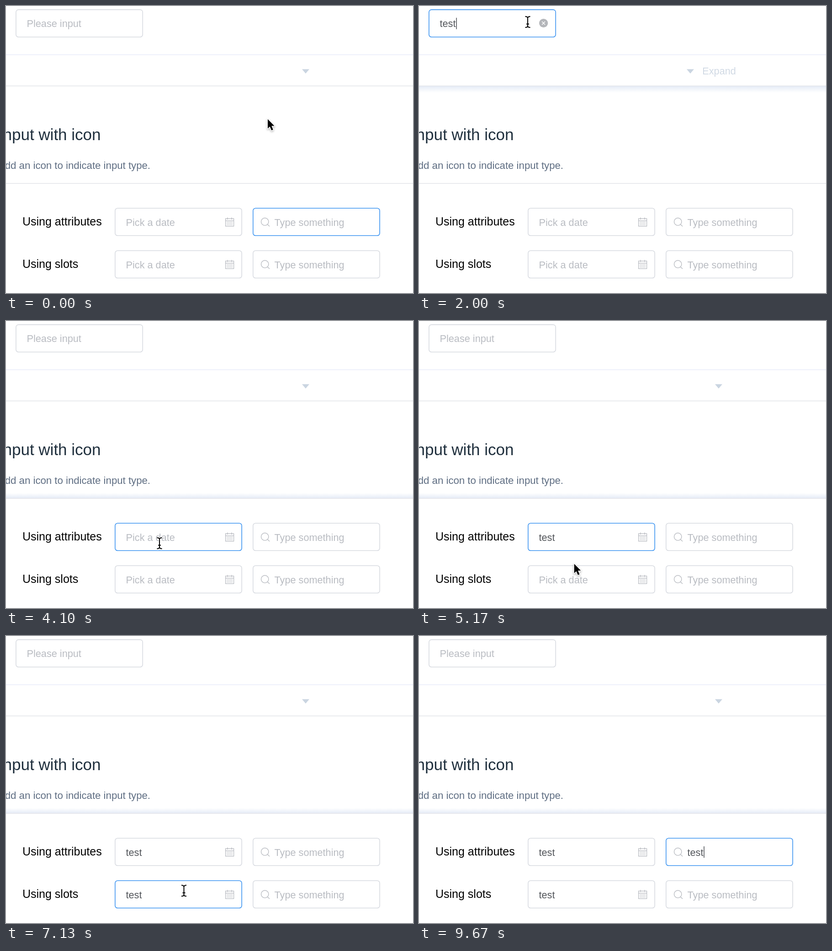
These frames come from a looping animation (891 px wide and 629 px high, 9870 ms). An HTML page with a canvas:

```html
<!DOCTYPE html>
<html lang="en">
<head>
<meta charset="utf-8">
<title>Input demo</title>
<style>
html, body { margin: 0; width: 100%; height: 100%; overflow: hidden; background: #fff; }
canvas { display: block; }
</style>
</head>
<body>
<canvas id="stage" width="891" height="629"></canvas>
<script>
const ctx = document.getElementById('stage').getContext('2d');
const LOOP = 9870, W = 279, H = 61.5;
const BORDER = [216, 219, 225], HOVER = [135, 141, 153], BLUE = [62, 149, 241];
const ICON = '#b8bbc1';

// focus and hover are [start, end] spans; typed holds [time, value] steps
const inputs = [
  { x: 21, y: 7.3, hint: 'Please input', clearable: true,
    focus: [[570, 2600], [2680, 3600]], hover: [[440, 2890]],
    typed: [[1230, 't'], [1370, 'te'], [1470, 'tes'], [1570, 'test'], [2680, '']] },
  { x: 238, y: 442.5, hint: 'Pick a date', icon: calendar,
    focus: [[3600, 5470]], hover: [[3380, 5080]],
    typed: [[4130, 't'], [4270, 'te'], [4470, 'tes'], [4530, 'test']] },
  { x: 238, y: 535.5, hint: 'Pick a date', icon: calendar,
    focus: [[5470, 7630]], hover: [[3090, 3300], [5200, 7240]],
    typed: [[6200, 't'], [6330, 'te'], [6530, 'tes'], [6600, 'test']] },
  { x: 540, y: 442.5, hint: 'Type something', icon: search, indent: 48,
    focus: [[-500, 570], [7630, 2 * LOOP]], hover: [[7390, 2 * LOOP]],
    typed: [[8200, 't'], [8530, 'tes'], [8670, 'test']] },
  { x: 540, y: 535.5, hint: 'Type something', icon: search, indent: 48,
    focus: [], hover: [], typed: [] }
];

const path = [
  [30, 573, 248], [480, 238, 35], [2000, 238, 35], [2400, 273, 37], [2860, 273, 37],
  [3090, 256, 568], [3120, 256, 568], [3540, 336, 487], [4900, 336, 487],
  [5420, 343, 572], [6970, 343, 572], [7600, 629, 487]
];
const hidden = [[1230, 2000], [4130, 4900], [6200, 6970], [8200, LOOP]];

const clamp = v => Math.min(1, Math.max(0, v));
const inOut = v => (v = clamp(v), v < .5 ? 4 * v ** 3 : 1 - 4 * (1 - v) ** 3);
const easeOut = v => 1 - (1 - clamp(v)) ** 2.2;
const smooth = v => (v = clamp(v), v * v * (3 - 2 * v));
const within = (t, spans) => spans.find(([a, b]) => t >= a && t < b);
const mix = (a, b, k) => a.map((v, i) => v + (b[i] - v) * k);
const rgb = c => `rgb(${c.map(Math.round)})`;

function transition(t, spans, duration, ease = inOut) {
  return clamp(spans.reduce((sum, [a, b]) =>
    sum + ease((t - a) / duration) - ease((t - b) / duration), 0));
}

function text(str, x, y, size, color, align = 'left') {
  ctx.font = `${size}px "Liberation Sans", Arial, sans-serif`;
  ctx.textAlign = align;
  ctx.fillStyle = color;
  ctx.fillText(str, x, y);
}

function line(points, color, width) {
  ctx.strokeStyle = color;
  ctx.lineWidth = width;
  ctx.beginPath();
  points.forEach(([x, y], i) => i ? ctx.lineTo(x, y) : ctx.moveTo(x, y));
  ctx.stroke();
}

function disc(x, y, r) {
  ctx.beginPath();
  ctx.arc(x, y, r, 0, 2 * Math.PI);
}

function calendar(x, y) {
  x += 242; y += 21.5;
  ctx.strokeStyle = ICON;
  ctx.lineWidth = 1.3;
  ctx.strokeRect(x + .6, y + 2, 18, 16.6);
  line([[x, y + 6.6], [x + 19, y + 6.6]], ICON, 1.3);
  for (const dx of [5, 14]) line([[x + dx, y - .5], [x + dx, y + 4]], ICON, 1.3);
  for (let row = 0; row < 3; row++)
    for (let col = 0; col < 4; col++)
      line([[x + 3.3 + col * 3.4, y + 9.5 + row * 3], [x + 5.7 + col * 3.4, y + 9.5 + row * 3]], ICON, 1.2);
}

function search(x, y) {
  ctx.strokeStyle = ICON;
  ctx.lineWidth = 1.4;
  disc(x + 26.7, y + 30.2, 8.2);
  ctx.stroke();
  line([[x + 32.6, y + 36.2], [x + 37, y + 40.6]], ICON, 1.4);
}

function clearIcon(x, y, hover) {
  ctx.fillStyle = rgb(mix([180, 182, 186], HOVER, hover));
  disc(x, y, 9.6);
  ctx.fill();
  for (const s of [-1, 1]) line([[x - 3.4, y - 3.4 * s], [x + 3.4, y + 3.4 * s]], '#fff', 1.4);
}

function drawInput(input, t) {
  const { x, y, hint, icon, indent = 25 } = input;
  const border = mix(mix(BORDER, HOVER, transition(t, input.hover, 200)), BLUE, transition(t, input.focus, 200));
  ctx.strokeStyle = rgb(border);
  ctx.lineWidth = 1.6;
  ctx.beginPath();
  ctx.roundRect(x + .8, y + .8, W - 1.6, H - 1.6, 5.5);
  ctx.stroke();
  if (icon) icon(x, y);

  const step = input.typed.filter(([at]) => at <= t).pop();
  const value = step ? step[1] : '';
  text(value || hint, x + indent - .5, y + 39, 21.7, value ? '#53565b' : '#b9bcc2');
  if (value && input.clearable) clearIcon(x + 251.6, y + 30.2, transition(t, [[2250, 2680]], 100));

  const focus = within(t, input.focus);
  if (!focus) return;
  const since = Math.max(focus[0], step ? step[0] : focus[0]);
  if (Math.floor((t - since) / 500) % 2) return;
  const caret = x + indent + .3 + (value ? ctx.measureText(value).width : 0);
  ctx.fillStyle = '#4a4d52';
  ctx.fillRect(caret, y + 18.5, 1.5, 25);
}

// Soft glow fading away from a block edge
function glow(from, to, alpha) {
  const g = ctx.createLinearGradient(0, from, 0, to);
  g.addColorStop(0, `rgba(222,230,244,${.75 * alpha})`);
  g.addColorStop(1, 'rgba(222,230,244,0)');
  ctx.fillStyle = g;
  ctx.fillRect(0, Math.min(from, to), 891, Math.abs(to - from));
}

const shapes = {
  arrow: new Path2D('M0 0V20.5L4.6 16.2L8.2 24.5L11.8 23L8.3 14.8H14.5Z'),
  beam: new Path2D('M-5.5 -12Q0 -12 0 -8.5Q0 -12 5.5 -12M0 -9V9M-5.5 12Q0 12 0 8.5Q0 12 5.5 12M-3 4.5H3'),
  hand: new Path2D('M-2 0C-2 -3 2 -3 2 0V8C3 6 6 6 6.5 9C8 7.5 10.5 8 10.5 10.5C12 9.5 14 10.5 14 12.5V17C14 20 12 21 11.5 25H0C-1 21 -5 18 -7.5 14C-9 11 -6 9.5 -4 12L-2 14Z')
};

function drawCursor(t) {
  if (within(t, hidden)) return;
  let i = path.findIndex(([at]) => at > t);
  if (i < 0) i = path.length;
  const a = path[Math.max(0, i - 1)], b = path[i] || a;
  const k = a === b ? 0 : smooth((t - a[0]) / (b[0] - a[0]));
  const [, x, y] = mix(a, b, k);
  const overInput = inputs.some(n => x > n.x && x < n.x + W && y > n.y && y < n.y + H);
  const shape = x > 262 && x < 283 && y < 48 ? 'hand' : overInput ? 'beam' : 'arrow';

  ctx.save();
  ctx.translate(x, y);
  ctx.lineJoin = 'round';
  ctx.shadowColor = 'rgba(0,0,0,.3)';
  ctx.shadowBlur = shape === 'beam' ? 0 : 4;
  ctx.shadowOffsetY = shape === 'beam' ? 0 : 2;
  ctx.strokeStyle = '#fff';
  ctx.lineWidth = shape === 'beam' ? 4 : 3;
  ctx.stroke(shapes[shape]);
  ctx.shadowColor = 'transparent';
  if (shape === 'beam') {
    ctx.strokeStyle = '#000';
    ctx.lineWidth = 2;
    ctx.stroke(shapes.beam);
  } else {
    ctx.fillStyle = shape === 'hand' ? '#fff' : '#000';
    ctx.fill(shapes[shape]);
    if (shape === 'hand') {
      ctx.strokeStyle = '#000';
      ctx.lineWidth = 1.5;
      ctx.stroke(shapes.hand);
    }
  }
  ctx.restore();
}

function drawPage(t) {
  ctx.fillStyle = '#fff';
  ctx.fillRect(0, 0, 891, 629);

  glow(176, 190, transition(t, [[210, 2900]], 200));
  glow(388, 377, transition(t, [[3080, 2 * LOOP]], 200));
  line([[0, 106.8], [891, 106.8]], '#e9ebf9', 1.6);
  line([[0, 175.2], [891, 175.2]], '#e2e4e9', 1.6);
  line([[0, 388.8], [891, 388.8]], '#e2e4e9', 1.6);

  const expand = transition(t, [[210, 2980]], 300, easeOut);
  const tip = 656 - 62 * expand;
  ctx.fillStyle = '#cad5e1';
  ctx.beginPath();
  ctx.moveTo(tip - 8, 138.5);
  ctx.lineTo(tip + 8, 138.5);
  ctx.lineTo(tip, 148);
  ctx.fill();
  ctx.globalAlpha = expand;
  text('Expand', tip + 26.3, 150, 21.7, '#d0d9e4');
  ctx.globalAlpha = 1;

  text('Input with icon', 207.5, 294, 35, '#1f2f3d', 'right');
  text('Add an icon to indicate input type.', 316, 357.3, 22.2, '#5e6d82', 'right');
  text('Using attributes', 36, 481, 25, '#000');
  text('Using slots', 36, 574, 25, '#000');
}

function frame(now) {
  const t = now % LOOP;
  drawPage(t);
  inputs.forEach(input => drawInput(input, t));
  drawCursor(t);
  requestAnimationFrame(frame);
}
frame(0);
</script>
</body>
</html>
```
